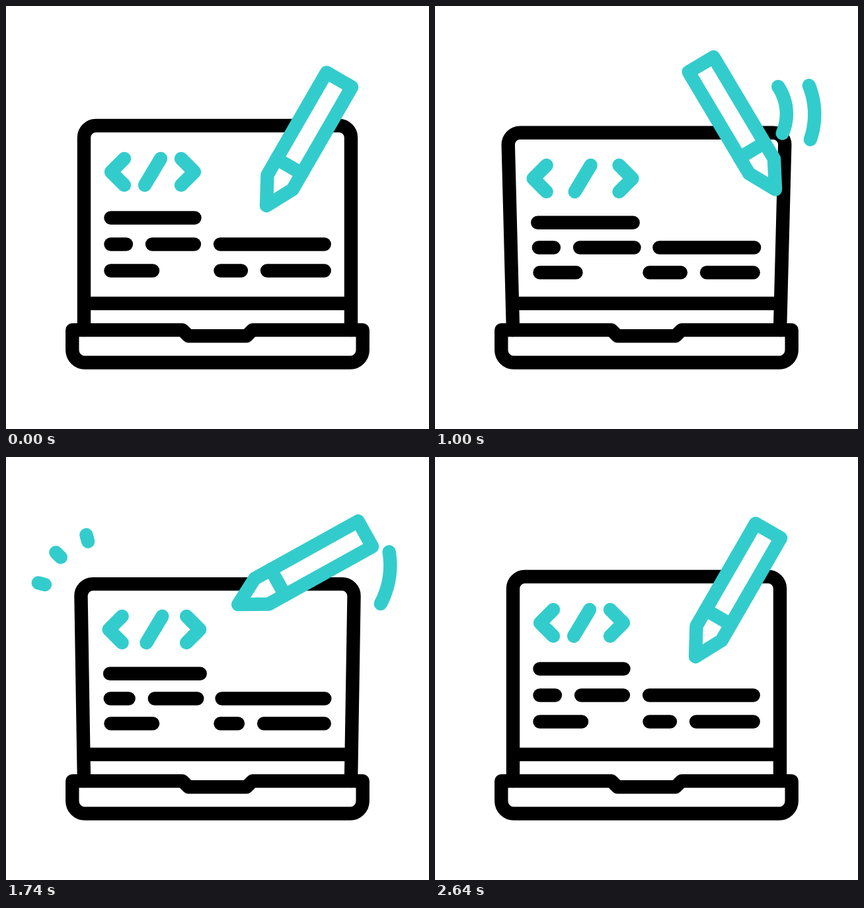
An HTML page with a canvas for the animation above (3000 ms loop, 640 by 640 pixels).

```html
<!DOCTYPE html>
<html lang="en">
<head>
<meta charset="utf-8">
<title>Coding laptop</title>
<style>
  html, body { margin: 0; width: 100%; height: 100%; overflow: hidden; background: #fff; }
  canvas { display: block; width: 100vw; height: 100vh; }
</style>
</head>
<body>
<canvas id="stage" width="640" height="640"></canvas>
<script>
const LOOP = 3000, BLACK = '#000', TEAL = '#33cccc', RAD = Math.PI / 180;
const ctx = document.getElementById('stage').getContext('2d');

const clamp = p => Math.min(1, Math.max(0, p));
const smooth = p => p * p * (3 - 2 * p);
const polar = (cx, cy, r, deg) => [cx + r * Math.cos(deg * RAD), cy + r * Math.sin(deg * RAD)];

// Eased value at time t of the key points [time, value], ...
function track(t, ...keys) {
  return keys.reduce((value, [time, next], i) => {
    if (i === 0) return next;
    const [before, from] = keys[i - 1];
    return value + (next - from) * smooth(clamp((t - before) / (time - before)));
  }, 0);
}

function line(points, color = BLACK) {
  ctx.beginPath();
  points.forEach(([x, y]) => ctx.lineTo(x, y));
  ctx.strokeStyle = color;
  ctx.stroke();
}

// Bar given by its outer ends
const bar = (y, left, right) => line([[left + 10, y], [right - 10, y]]);

function drawLaptop(t) {
  // Offset from rest when leaning forward, back, and forward again
  const lean = (fwd, back, fwd2 = fwd) =>
    track(t, [200, 0], [800, fwd], [1400, back], [2000, fwd2], [2640, 0]);
  const drop = lean(1, 1), tilt = lean(-1, 1), shift = lean(0, 6);

  const x = 118 + lean(-13.3, 8), y = 181 + lean(10, 12.8);
  ctx.beginPath();
  ctx.moveTo(118, 490);
  ctx.arcTo(x, y, 320, y, 18);
  ctx.arcTo(640 - x, y, 522, 490, 18);
  ctx.lineTo(522, 490);
  ctx.strokeStyle = BLACK;
  ctx.stroke();
  line([[122, 450], [518, 450]]);

  ctx.beginPath();
  ctx.moveTo(267, 490.3);
  ctx.lineTo(100.3, 490.3);
  ctx.arcTo(100.3, 539.5, 320, 539.5, 19);
  ctx.arcTo(539.7, 539.5, 539.7, 490.3, 19);
  ctx.lineTo(539.7, 490.3);
  ctx.lineTo(373, 490.3);
  ctx.lineTo(364, 499.3);
  ctx.lineTo(276, 499.3);
  ctx.closePath();
  ctx.stroke();

  // Rows of code; the gaps between the bars slide
  const rowY = i => 320.5 + 40 * i + drop * (7.2 - 2.2 * i);
  const rowX = i => 148.5 + tilt * (6.8 - 3.4 * i);
  const gap1 = 201.5 + lean(-13, 29);
  const gap2 = 304.5 + lean(25.5, -11, 13), half2 = 9.6 - shift * 0.4;
  const gap3 = 375.5 + lean(26, -12.5, 0);
  bar(rowY(0), rowX(0), 295.5 + lean(25.5, -17.8));
  bar(rowY(1), rowX(1), gap1 - 9.6);
  bar(rowY(1), gap1 + 9.6, gap2 - half2);
  bar(rowY(1), gap2 + half2, 491.7 - 3 * tilt);
  bar(rowY(2), rowX(2), 232 + lean(-25, 38));
  bar(rowY(2), 314.5, gap3 - 9.6);
  bar(rowY(2), gap3 + 9.6, 491.7);

  const mid = 251 + 10 * drop, open = lean(18, -5.2, 13), slash = 222 + shift;
  for (const side of [-1, 1]) {
    const arm = 222 + side * (43 + open) + shift;
    line([[arm, mid - 20], [arm + side * 20, mid], [arm, mid + 20]], TEAL);
  }
  line([[slash + 12, mid - 20], [slash - 12, mid + 20]], TEAL);
}

// Stroke along a path: the head leaves fast, the tail follows and catches up
function dash(t, start, head, tail, pointAt) {
  if (t <= start || t >= start + tail.time) return;
  const at = ({ time, power }) => clamp((t - start) / time) ** power;
  const from = at(tail), to = at(head), steps = 40;
  line(Array.from({ length: steps + 1 }, (_, i) => pointAt(from + (to - from) * i / steps)), TEAL);
}

function drawTrails(t) {
  const spiral = (angle, sweep, radius) => s => polar(458, 165, radius + 9 * s, angle - sweep * s);
  dash(t, 760, { time: 910, power: 1.05 }, { time: 1050, power: 1.25 }, spiral(92, 462, 114.5));
  dash(t, 800, { time: 600, power: 1.05 }, { time: 680, power: 1.7 }, spiral(60, 300, 72));
}

function drawSparks(t) {
  for (const deg of [195, 225, 255]) {
    dash(t, 1130, { time: 620, power: 0.65 }, { time: 700, power: 2.8 },
      s => polar(148, 217, 69 + 34 * s, deg));
  }
}

function drawPencil(t) {
  const angle = track(t, [200, 30], [500, 67], [2100, -353], [2640, -330]);
  const y = track(t, [200, 201], [500, 226], [1040, 171.5], [1640, 162], [2100, 221], [2640, 201]);
  ctx.save();
  ctx.translate(458, y);
  ctx.rotate(angle * RAD);
  ctx.translate(-4.8, 119.6);
  ctx.beginPath();
  ctx.moveTo(0, 0);
  ctx.lineTo(-22, -41);
  ctx.lineTo(-22, -220);
  ctx.lineTo(22, -220);
  ctx.lineTo(22, -41);
  ctx.closePath();
  ctx.fillStyle = '#fff';
  ctx.strokeStyle = TEAL;
  ctx.fill();
  ctx.stroke();
  line([[-22, -69], [22, -69]], TEAL);
  ctx.restore();
}

function draw(now) {
  const t = now % LOOP;
  ctx.clearRect(0, 0, 640, 640);
  ctx.lineWidth = 20.4;
  ctx.lineCap = ctx.lineJoin = 'round';
  drawLaptop(t);
  drawTrails(t);
  drawSparks(t);
  drawPencil(t);
  requestAnimationFrame(draw);
}
requestAnimationFrame(draw);
</script>
</body>
</html>
```
